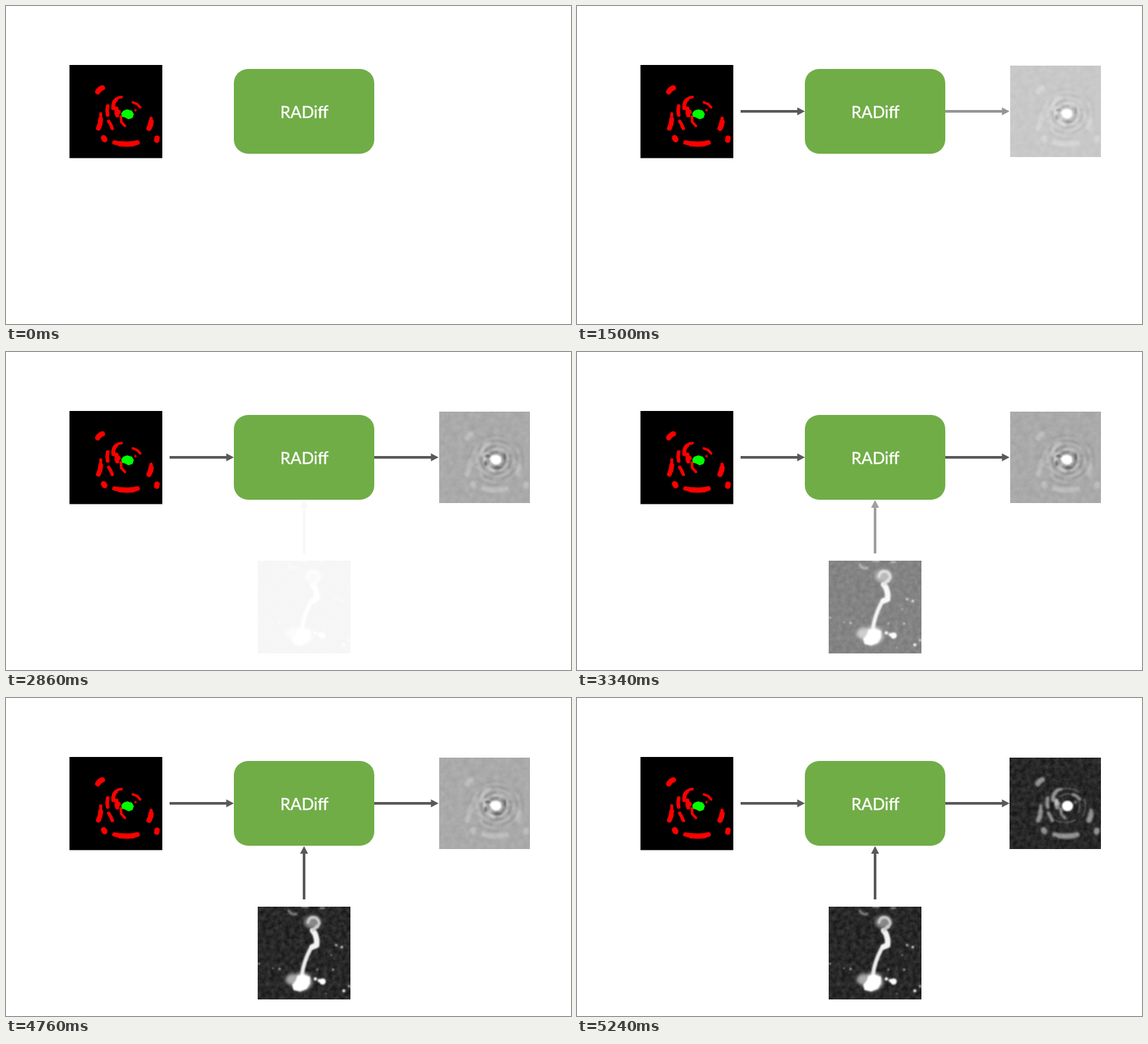
An HTML page for the animation above (8.32 s loop, 853 by 480 pixels).

```html
<!DOCTYPE html>
<html lang="en">
<head>
<meta charset="utf-8">
<title>RADiff</title>
<style>
  html, body { margin: 0; width: 100%; height: 100%; overflow: hidden; background: #fff; }
  #stage { display: block; width: 100vw; height: 100vh; }
  text { font: 24.6px Carlito, Lato, sans-serif; fill: #fff; stroke: #fff; stroke-width: .45; text-anchor: middle; }
  .arc { fill: none; stroke-linecap: round; stroke-linejoin: round; }
  filter { color-interpolation-filters: sRGB; }
</style>
</head>
<body>
<svg id="stage" viewBox="0 0 853 480">
  <defs>
    <filter id="soft" x="-20%" y="-20%" width="140%" height="140%"><feGaussianBlur stdDeviation="1.1"/></filter>
    <filter id="softer" x="-20%" y="-20%" width="140%" height="140%"><feGaussianBlur stdDeviation="1.6"/></filter>
    <filter id="haze" x="-30%" y="-30%" width="160%" height="160%"><feGaussianBlur stdDeviation="2.4"/></filter>
    <filter id="darkNoise" x="0" y="0" width="1" height="1">
      <feTurbulence type="fractalNoise" baseFrequency=".14" numOctaves="2" seed="4"/>
      <feColorMatrix values=".2 0 0 0 .055  .2 0 0 0 .055  .2 0 0 0 .055  0 0 0 0 1"/>
    </filter>
    <filter id="greyNoise" x="0" y="0" width="1" height="1">
      <feTurbulence type="fractalNoise" baseFrequency=".11" numOctaves="2" seed="9"/>
      <feColorMatrix values=".08 0 0 0 .625  .08 0 0 0 .625  .08 0 0 0 .625  0 0 0 0 1"/>
    </filter>
    <path id="arrow" fill="#595959" d="M0-2H86V2H0zM85.5-6 97 0 85.5 6z"/>
  </defs>

  <rect x="95.8" y="89" width="140.2" height="140.6"/>
  <g id="mask"></g>
  <path fill="#0f0" d="M174 162 177 158 183 156 190 158 193 163 191 169 185 171 179 168 175 167z"/>

  <rect x="344" y="95" width="212" height="128" rx="21.5" fill="#70ad47"/>
  <text x="450.5" y="169">RADiff</text>

  <use id="inArrow" href="#arrow" x="247" y="159"/>

  <g id="output">
    <use href="#arrow" x="556" y="159"/>
    <svg x="654" y="90" width="137" height="138" viewBox="654 90 137 138">
      <rect x="654" y="90" width="137" height="138" filter="url(#greyNoise)"/>
      <g id="ripples" class="arc" filter="url(#softer)"></g>
      <g id="faint" filter="url(#softer)" transform="translate(557)" opacity=".24"></g>
      <g filter="url(#soft)" fill="#5c5c5c" opacity=".75">
        <ellipse cx="727" cy="157" rx="4" ry="2.5"/><ellipse cx="743" cy="174.5" rx="6" ry="2.5"/>
        <ellipse cx="724" cy="168" rx="2" ry="4"/><ellipse cx="753" cy="158" rx="2" ry="5"/>
      </g>
      <path fill="#fff" filter="url(#soft)" d="M730 161 734 156 741 155 747 158 748 165 744 169.5 738 170 733 167z"/>
    </svg>
  </g>

  <svg id="result" x="653" y="90" width="138" height="138" viewBox="653 90 138 138">
    <rect x="653" y="90" width="138" height="138" filter="url(#darkNoise)"/>
    <g id="glow" filter="url(#softer)" transform="translate(557)" opacity=".5"></g>
    <g class="arc" filter="url(#soft)" stroke="#aaa" stroke-width="2" opacity=".4">
      <path d="M729 149Q741 141 754 149Q762 158 757 173M723 185Q738 191 753 184M724 140Q742 132 758 142M766 153Q770 166 764 178"/>
    </g>
    <ellipse cx="724" cy="158" rx="3" ry="5" fill="#ccc" filter="url(#soft)" opacity=".7"/>
    <ellipse cx="740.5" cy="163" rx="8.5" ry="8" fill="#fff" filter="url(#soft)"/>
  </svg>

  <g id="style">
    <path fill="#595959" d="M448 304V235H444L450 223.5 456 235H452V304z"/>
    <svg x="380" y="315" width="140" height="140" viewBox="380 315 140 140">
      <rect x="380" y="315" width="140" height="140" filter="url(#darkNoise)"/>
      <g filter="url(#haze)" fill="#aaa">
        <ellipse cx="463" cy="338" rx="13" ry="10" opacity=".75"/>
        <ellipse cx="433" cy="425" rx="11" ry="9"/>
        <ellipse cx="447" cy="428" rx="15" ry="14"/>
      </g>
      <g class="arc" filter="url(#soft)">
        <path stroke="#777" stroke-width="4" d="M427 321Q431 328 438 326M447 315H455M475 317H480"/>
        <path stroke="#ccc" stroke-width="4" d="M456 339Q457 331 464 331T473 340L470 346"/>
        <path stroke="#eee" stroke-width="6" d="M447 417Q449 399 460 378"/>
        <path stroke="#f4f4f4" stroke-width="8.5" d="M462 376 469 373Q470 363 466 355L463 351"/>
        <path stroke="#ccc" stroke-width="5" d="M464 350 469 345"/>
        <path fill="#fff" d="M432 433 437 427 440 419 449 417 459 421 459 431 454 439 444 443 434 441z"/>
      </g>
      <g id="stars" fill="#fff" filter="url(#soft)"></g>
    </svg>
  </g>
</svg>
<script>
  const $ = id => document.getElementById(id);

  // stroke width, path
  const marks = [
    [8, 'M138.5 129.5Q141 125 145.5 123.5'],
    [6, 'M162 154Q161.5 145 166 141.5'], [4, 'M166 140.5Q170 137.5 174.5 137.5'],
    [5.5, 'M153.5 151Q152 158 153.5 164.5'],
    [6.5, 'M166.5 155 168 165M170 160 167 162'],
    [3.8, 'M191.5 145.5 198 148 202.5 153'],
    [3.5, 'M195.5 157V157.5'],
    [4.5, 'M143 162.5V167'], [7.2, 'M143 171 142 178 139.5 184.5'],
    [5, 'M155 174 158 179 160.5 185'],
    [4, 'M173.5 167 174 175 179.5 181'],
    [5, 'M219 169.5V172'], [8, 'M219 175 218 180 216 184.5'],
    [8.5, 'M147.5 199 149 201.5'],
    [6.5, 'M163.5 206 172 207.5'], [8, 'M172 208 183 208.5 192 208'], [7, 'M192 207.5 198.5 206'],
    [8, 'M228 199.5 227.5 202.5']
  ];
  const strokes = color => marks.map(([w, d]) =>
    `<path class="arc" stroke="${color}" stroke-width="${w}" d="${d}"/>`).join('');
  $('mask').innerHTML = strokes('#f00');
  $('faint').innerHTML = $('glow').innerHTML = strokes('#fff');

  // broken alternating rings that weaken outwards
  $('ripples').innerHTML = Array.from({ length: 7 }, (_, i) => {
    const r = 13 + i * 4.6;
    return `<ellipse cx="740" cy="163" rx="${r}" ry="${r * .93}" stroke="${i % 2 ? '#fff' : '#333'}"
      stroke-width="3" stroke-dasharray="${r * .8} ${r * .5}" stroke-dashoffset="${i * 17}" opacity="${.36 * .78 ** i}"/>`;
  }).join('');

  const stars = [[478, 428, 4.8], [473, 426.5, 2.5], [467, 424, 2.5], [510, 442, 2.3], [498.5, 373, 1.8],
    [507, 376, 2], [413, 409, 1.7], [403, 408, 1.3], [382, 401, 1.6], [470, 410, 1.4],
    [494, 410, 1.6], [491, 388, 1.3], [518, 435, 1.8], [483, 446, 1.2]];
  $('stars').innerHTML = stars.map(([x, y, r]) =>
    `<circle cx="${x}" cy="${y}" r="${r}" opacity="${Math.min(1, r / 2.4)}"/>`).join('');

  // id, start (ms), first level (in steps), number of steps
  const fades = [
    ['inArrow', 120, .6, 13],
    ['output', 960, .6, 15],
    ['style', 2860, .6, 15],
    ['result', 4760, 0, 8]
  ];
  const LOOP = 8320, STEP = 60;

  function draw(now) {
    const t = now % LOOP;
    for (const [id, start, first, count] of fades) {
      const level = t < start ? 0 : (Math.floor((t - start) / STEP) + first) / count;
      $(id).style.opacity = Math.min(1, level);
    }
  }
  const origin = performance.now();
  function tick() {
    draw(performance.now() - origin);
    requestAnimationFrame(tick);
  }
  tick();
</script>
</body>
</html>
```
